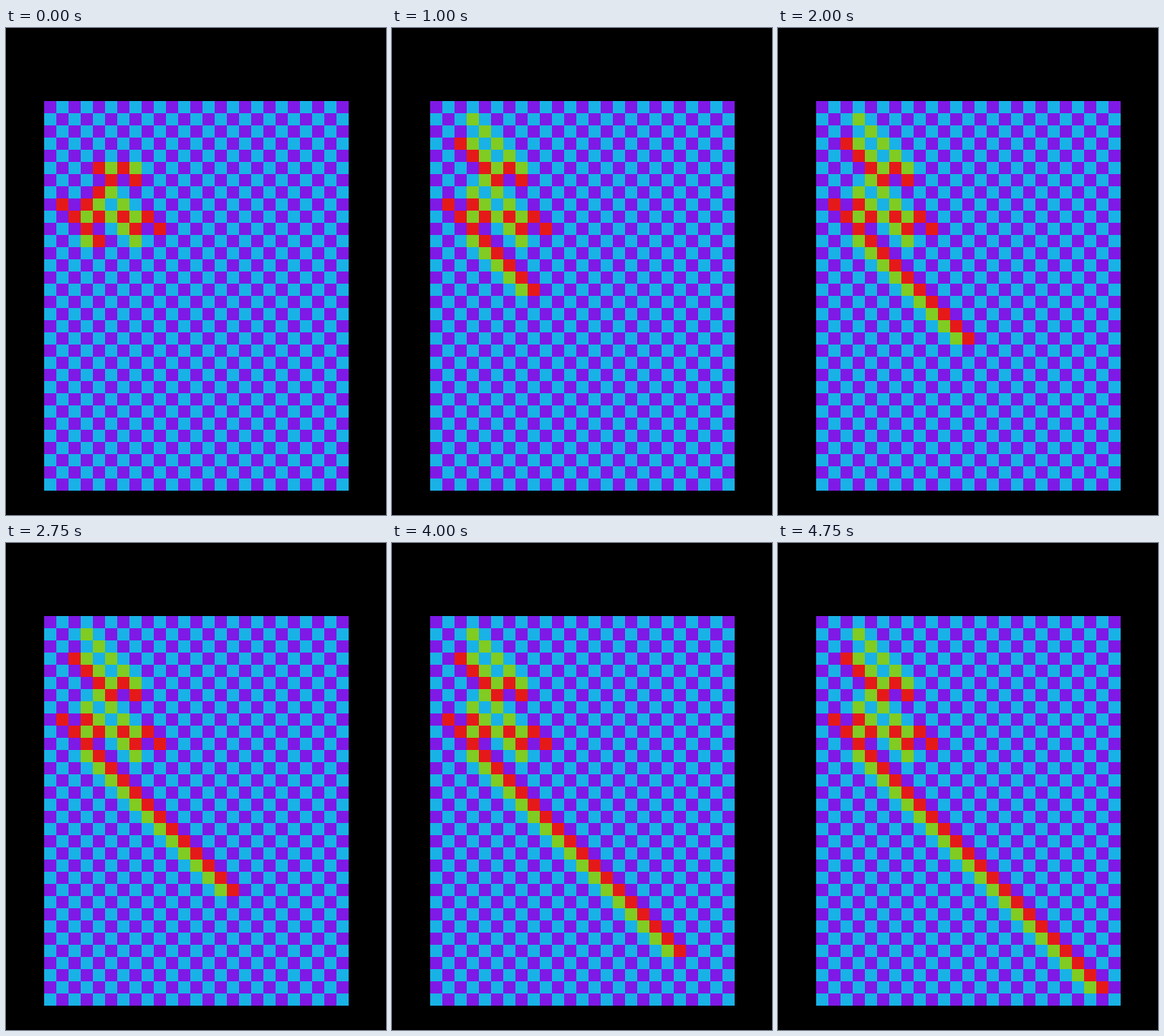
An HTML page with a canvas that plays this animation: 468 px wide and 600 px high, repeating every 5 s.

```html
<!DOCTYPE html>
<html lang="en">
<head>
<meta charset="utf-8">
<title>Checkerboard trail</title>
<style>
  html, body { margin: 0; width: 100%; height: 100%; overflow: hidden; background: #000; }
  canvas { display: block; }
</style>
</head>
<body>
<canvas id="stage" width="468" height="600"></canvas>
<script>
const ctx = document.getElementById('stage').getContext('2d');
const CELL = 15, LEFT = 47, TOP = 90, COLS = 25, ROWS = 32;
const STEP = 250, STEPS = 20;

// Colours by parity of column + row: even, odd.
const BOARD = ['#7f19e6', '#19b2e6'];
const FLIPPED = ['#80cc22', '#e61919'];

// Each step toggles cells, given as row: column digits.
const TOGGLES = [
  { 5: '4567', 6: '57', 7: '45', 8: '1346', 9: '2345678', 10: '3679', 11: '347' },
  { 2: '4', 3: '5', 4: '346', 6: '4' },
  { 1: '3', 3: '23' },
  { 7: '34' }
];

function flippedCells(step) {
  const cells = new Set();
  const toggle = (col, row) => {
    const key = row * COLS + col;
    if (!cells.delete(key)) cells.add(key);
  };
  for (const rows of TOGGLES.slice(0, step + 1)) {
    for (const row in rows) {
      for (const col of rows[row]) toggle(+col, +row);
    }
  }
  // The trail grows one diagonal pair per step.
  for (let k = 1; k <= step; k++) {
    toggle(3 + k, 11 + k);
    toggle(4 + k, 11 + k);
  }
  return cells;
}

function draw(step) {
  const cells = flippedCells(step);
  ctx.fillStyle = '#000';
  ctx.fillRect(0, 0, 468, 600);
  for (let row = 0; row < ROWS; row++) {
    for (let col = 0; col < COLS; col++) {
      const colours = cells.has(row * COLS + col) ? FLIPPED : BOARD;
      ctx.fillStyle = colours[(col + row) % 2];
      ctx.fillRect(LEFT + col * CELL, TOP + row * CELL, CELL, CELL);
    }
  }
}

const start = performance.now();
let shown = 0;

function tick() {
  const step = Math.floor((performance.now() - start) / STEP) % STEPS;
  if (step !== shown) draw(shown = step);
  requestAnimationFrame(tick);
}

draw(0);
requestAnimationFrame(tick);
</script>
</body>
</html>
```
